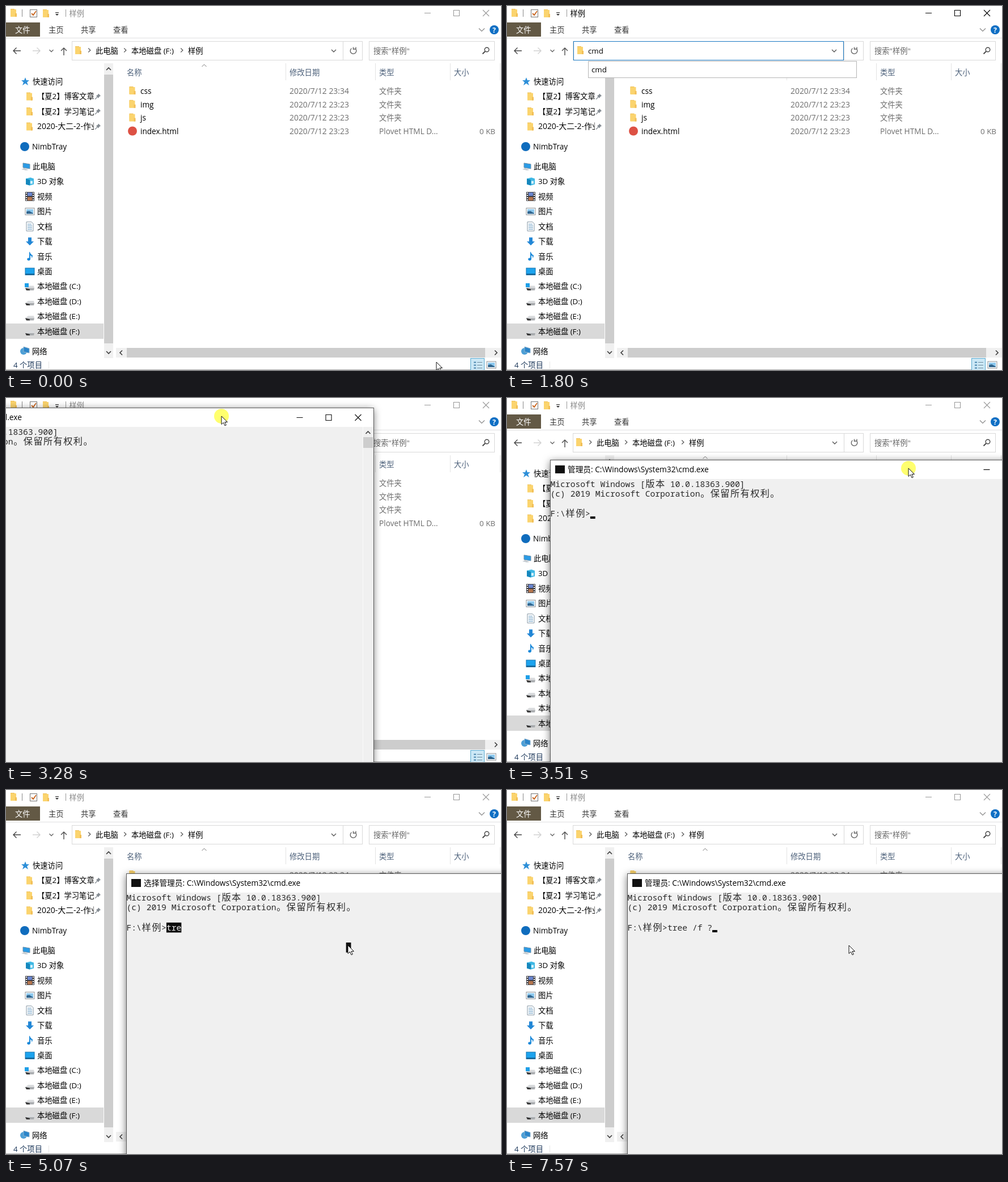
Recreate the animation shown at these times as an HTML page. Size 873 by 642 pixels, loop 8000 ms.

```html
<!DOCTYPE html>
<html lang="zh-CN">
<head>
<meta charset="utf-8">
<title>Explorer and console</title>
<style>
html, body { margin: 0; width: 100%; height: 100%; overflow: hidden; background: #fff; }
svg { display: block; width: 100%; height: 100%; }
text { font-family: "Open Sans", "Noto Sans CJK SC", "Noto Sans CJK", sans-serif; white-space: pre; }
.term { font: 300 14.67px "Noto Sans Mono", "Liberation Mono", monospace; }
.han { font: 300 16.2px "Noto Sans CJK SC", "Noto Sans CJK", sans-serif; }
</style>
</head>
<body>
<svg id="stage" viewBox="0 0 873 642" xmlns="http://www.w3.org/2000/svg"></svg>
<script>
const LOOP = 8000, CELL = 8.8, ROW = 17.6, INK = '#2b2b2b';
const stage = document.getElementById('stage');

// Drawing helpers
const esc = s => s.replace(/&/g, '&amp;').replace(/</g, '&lt;').replace(/>/g, '&gt;');
const rect = (x, y, w, h, fill, more = '') =>
  `<rect x="${x}" y="${y}" width="${w}" height="${h}" fill="${fill}" ${more}/>`;
const frame = (x, y, w, h, stroke) => rect(x + .5, y + .5, w - 1, h - 1, 'none', `stroke="${stroke}"`);
const path = (d, fill, more = '') => `<path d="${d}" fill="${fill}" ${more}/>`;
const line = (d, stroke, w = 1, more = '') => path(d, 'none', `stroke="${stroke}" stroke-width="${w}" ${more}`);
const circle = (x, y, r, fill, more = '') => `<circle cx="${x}" cy="${y}" r="${r}" fill="${fill}" ${more}/>`;
const text = (x, cy, s, fill = '#000', size = 13.3, more = '') =>
  `<text x="${x}" y="${cy + 4.8}" font-size="${size}" fill="${fill}" ${more}>${esc(s)}</text>`;
const group = (id, body) => `<g id="${id}">${body}</g>`;
const at = (x, y, body) => `<g transform="translate(${x} ${y})">${body}</g>`;

function chevron(x, y, dir, color = '#444', r = 4, w = 1.3) {
  const turn = { up: 0, right: 90, down: 180, left: 270 }[dir];
  return line(`M${-r} ${r / 2}L0 ${-r / 2}L${r} ${r / 2}`, color, w, `transform="translate(${x} ${y}) rotate(${turn})"`);
}
const folder = (x, y) => at(x, y,
  rect(-5, -7, 7, 13, '#eebf55') + path('M-5 -6H5V7H-5Z', '#fbd46e') + path('M3 1H6V7H3Z', '#f2bf58'));
const drive = (x, y) => at(x, y,
  path('M-8 1L-3 -3H7L8 1Z', '#d9dbdd') + path('M-8 1H8L7 5H-6Z', '#a9acaf') + path('M-8 1L0 3V5H-6Z', '#333'));
const picture = (x, y) => at(x, y,
  rect(-8, -6, 16, 12, '#fff', 'stroke="#8a8f94"') + rect(-6, -4, 12, 8, '#8cc8ee') +
  path('M-6 4V0L-1 -1L6 3V4Z', '#31658d'));
const pin = (x, y) => at(x, y,
  path('M1 -5L5 -1L3 0L1 3L-3 -1L0 -3Z', '#858c93') + line('M-1 1L-5 5', '#858c93', 1.3));
const monitor = (x, y) => at(x, y,
  path('M-5 -6L7 -4V4L-5 2Z', '#2a9be6', 'stroke="#6f8fa8"') + path('M-8 5L-3 3L5 6L0 7Z', '#c5cbd0'));
const controls = (min, max, close, y, color) =>
  line(`M${min - 5.5} ${y + .5}h11M${max - 5} ${y - 4.5}h10v10h-10ZM${close - 5.5} ${y - 5}l11 11m0 -11l-11 11`, color, 1.1);

// Half and full width characters on the console grid
function term(col, row, s, fill = INK) {
  let out = '';
  for (const run of s.match(/[\x20-\x7e]+|[^\x20-\x7e]+/g) || []) {
    const wide = run.charCodeAt(0) > 126, step = wide ? 2 : 1, inset = wide ? 1.2 : .5;
    const xs = [...run].map((c, i) => (inset + (col + i * step) * CELL).toFixed(1)).join(' ');
    out += `<text class="${wide ? 'han' : 'term'}" x="${xs}" y="${(46.8 + row * ROW).toFixed(1)}" fill="${fill}">${esc(run)}</text>`;
    col += run.length * step;
  }
  return out;
}
const cell = (col, row, n, fill) => rect(.5 + col * CELL, 33 + row * ROW, n * CELL, ROW, fill);

function sidebar() {
  const star = path('M0 -7L2 -2L7 -2L3 1.5L5 7L0 3.5L-5 7L-3 1.5L-7 -2L-2 -2Z', '#2d8fd8');
  const icons = {
    cube: path('M-7 -5L1 -7L7 -5V5L0 7L-7 5Z', '#3fb8e4') + path('M-7 -5L0 -3V7L-7 5Z', '#1587bd') + path('M1 -1H5V4H1Z', '#d7f1fb'),
    film: rect(-8, -8, 16, 16, '#3c3c42') + rect(-4, -7, 8, 6, '#6a86cf') + rect(-4, 1, 8, 6, '#b5764f') +
      line('M-6 -7V8M6 -7V8', '#fff', 2, 'stroke-dasharray="2 2"'),
    doc: path('M-6 -8H3L6 -5V8H-6Z', '#fff', 'stroke="#8395a3"') + line('M-4 -4H3M-4 -1H4M-4 2H4M-4 5H4', '#5b93bd'),
    down: path('M-3 -7H3V0H7L0 7L-7 0H-3Z', '#2287d6'),
    note: path('M0 -8Q1 -4 5 -2Q5 1 3 3Q4 -1 1 -2V5Q0 8 -3 7Q-6 6 -4 3Q-2 2 -1 3V-8Z', '#1687d9'),
    desk: rect(-8, -6, 16, 12, '#1ca3ee', 'stroke="#1673ad"') + rect(-8, 4, 16, 2, '#125c8c'),
  };
  let out = rect(0, 560, 172, 27, '#d9d9d9') + at(34, 133, star) + text(47, 133, '快速访问');
  ['【夏2】博客文章', '【夏2】学习笔记', '2020-大二-2-作业'].forEach((s, i) => {
    const y = 159.5 + i * 26.5;
    out += folder(41, y) + text(55, y, s, '#000', i < 2 ? 13.3 : 13.9, 'clip-path="url(#nameClip)"') + pin(162, y);
  });
  out += circle(33, 248, 8, '#0f6cbd') + text(46, 248, 'NimbTray', '#000', 13.6);
  out += monitor(35, 283) + text(47, 283, '此电脑');
  const rows = [['3D 对象', 'cube'], ['视频', 'film'], ['图片', ''], ['文档', 'doc'], ['下载', 'down'], ['音乐', 'note'], ['桌面', 'desk']];
  rows.forEach(([s, icon], i) => {
    const y = 309.5 + i * 26.45;
    out += (icon ? at(42, y, icons[icon]) : picture(42, y)) + text(55, y, s);
  });
  [...'CDEF'].forEach((c, i) => {
    const y = 494.5 + i * 26.5;
    out += drive(42, y + 2) + text(55, y, `本地磁盘 (${c}:)`);
  });
  out += rect(33, 489, 7, 7, '#1e9fe8');
  out += at(33, 608, circle(-2, 1, 6, '#4d9fd6') + path('M-2 -7L8 -4V4L-2 2Z', '#2a84c9', 'stroke="#8fb2cc"')) + text(46, 609, '网络');
  out += rect(173, 101, 16, 520, '#f0f0f0') + rect(173, 121, 16, 474, '#cdcdcd');
  return out + chevron(181, 111, 'up', '#404040', 4, 1.7) + chevron(181, 611, 'down', '#404040', 4, 1.7);
}

function fileList() {
  let out = '';
  [['名称', 213], ['修改日期', 500], ['类型', 658], ['大小', 790]].forEach(([s, x]) => out += text(x, 117, s, '#4c607a'));
  [493, 651, 783, 871].forEach(x => out += rect(x, 101, 1, 30, '#e3e3e3'));
  out += chevron(349.5, 105, 'up', '#777', 4, 1);
  ['css', 'img', 'js', 'index.html'].forEach((s, i) => {
    const y = 150 + i * 23.8, last = i === 3;
    out += last ? circle(223, 220.5, 8, '#dd5144') : folder(222.5, y - 1);
    out += text(237, y, s, '#000', 13.6);
    out += text(500, y, i ? '2020/7/12 23:23' : '2020/7/12 23:34', '#6d6d6d', 13.9);
    out += text(658, y, last ? 'Plovet HTML D...' : '文件夹', '#6d6d6d', last ? 13.7 : 13.3);
  });
  out += text(835, 221.4, '0 KB', '#6d6d6d', 13.4);
  out += rect(194, 603, 679, 17, '#f0f0f0') + rect(213, 603, 632, 17, '#cdcdcd');
  return out + chevron(203, 611.5, 'left', '#404040', 4, 1.7) + chevron(864, 611.5, 'right', '#404040', 4, 1.7);
}

function explorer() {
  let out = rect(0, 0, 873, 642, '#fff');
  out += folder(13, 12) + rect(28, 6, 1, 13, '#888') + folder(70, 13) + rect(105, 6, 1, 13, '#999');
  out += rect(42.5, 6.5, 12, 13, '#fff', 'stroke="#777"') + line('M45 13L48 16L53 9', '#c8641e', 1.8);
  out += rect(87, 11, 6, 1.2, '#333') + path('M87 14H93L90 17Z', '#333');
  out += group('winTitle', '');
  out += rect(0, 29, 60, 25, '#635945') + text(16, 42, '文件', '#fff');
  [['主页', 75], ['共享', 132], ['查看', 189]].forEach(([s, x]) => out += text(x, 42, s, '#333'));
  out += chevron(839, 42, 'down', '#8a8a8a', 5, 1.2) + circle(861, 42, 8, '#0f6fc4') +
    text(858, 42, '?', '#fff', 12.5, 'font-weight="700"');
  out += rect(0, 56, 873, 1, '#dfe0e1');
  out += line('M26 79H13M18.5 73.5L13 79L18.5 84.5', '#444', 1.4) + line('M47 79H60M54.5 73.5L60 79L54.5 84.5', '#d2d2d2', 1.4);
  out += chevron(80, 79, 'down', '#666', 3.5) + line('M102 87V74M97 79L102 74L107 79', '#555', 1.5);
  out += frame(116, 62, 513, 34, '#d9d9d9') + rect(594, 62, 1, 34, '#d9d9d9');
  out += line('M616 75A5.3 5.3 0 1 1 609.5 74.7M612.5 72.5V77M617 72.5V76H613', '#666', 1.4);
  out += frame(640, 62, 222, 34, '#d9d9d9') + text(648, 79, '搜索"样例"', '#666');
  out += circle(848, 77, 3.8, 'none', 'stroke="#444" stroke-width="1.4"') + line('M845 80L840.5 84.5', '#444', 1.8);
  out += group('address', '');
  out += sidebar() + fileList();
  out += text(13, 633, '4 个项目', '#1e395b') + rect(75, 627, 1, 13, '#e6e6e6');
  out += rect(819.5, 621.5, 24, 22, '#cce8f6', 'stroke="#58a9d0"');
  out += line('M825 628.5H829M825 633.5H829M825 638.5H829', '#4b86ad', 2) + line('M831 628.5H840M831 633.5H840M831 638.5H840', '#6d8a9c');
  return out + picture(856, 633) + rect(0, 641, 819, 1, '#a9a9a9');
}

const crumbs = folder(127, 78) + chevron(147, 78, 'right', '#555', 3.6) + text(158, 79, '此电脑') +
  chevron(210, 78, 'right', '#555', 3.6) + text(221, 79, '本地磁盘 (F:)') +
  chevron(310, 78, 'right', '#555', 3.6) + text(321, 79, '样例') + chevron(578, 79, 'down', '#555');

function addressEdit(t) {
  let out = rect(117, 62, 477, 34, '#fff') + frame(117, 62, 477, 34, '#1a78c2') +
    folder(129, 78) + chevron(577, 79, 'down', '#555');
  if (t < 1140) return out + rect(143, 69, 43, 20, '#0078d7') + text(143, 79, 'F:\\样例', '#fff');
  const n = t < 1250 ? 1 : t < 1360 ? 2 : 3;
  out += text(143, 79, 'cmd'.slice(0, n));
  return t < 1800 ? out + rect([150, 162, 171][n - 1], 70, 1, 18, '#000') : out;
}

function suggestions(t) {
  if (t < 1180 || t >= 2080) return '';
  const rows = t < 1290 ? ['cmd', 'C:\\', 'C:\\Windows', 'css', 'C:\\Windows\\System32'] : ['cmd'];
  const h = rows.length * 26 + 4;
  return rect(143, 97, 474, h, '#fff') + frame(143, 97, 474, h, '#b5b5b5') +
    rows.map((s, i) => text(149, 112 + i * 26, s)).join('');
}

function consoleWindow() {
  let out = rect(0, 0, 900, 636, '#fff', 'style="filter:drop-shadow(0 2px 7px rgba(0,0,0,.55))"');
  out += rect(0, 33, 900, 603, '#f0f0f0') + rect(881, 33, 1, 603, '#fafafa') + rect(882, 51, 17, 19, '#cdcdcd');
  out += chevron(890.5, 43, 'up', '#404040', 4, 1.7);
  out += rect(9, 9, 17, 14, '#111') + controls(770, 821, 873, 16, '#111');
  out += term(0, 0, 'Microsoft Windows [版本 10.0.18363.900]');
  out += term(0, 1, '(c) 2019 Microsoft Corporation。保留所有权利。') + term(0, 3, 'F:\\样例>');
  return out + group('live', '') + frame(0, -1, 901, 637, '#5a5a5a');
}

stage.innerHTML =
  '<defs><clipPath id="nameClip"><rect x="0" y="100" width="155" height="200"/></clipPath></defs>' +
  explorer() + group('drop', '') + group('console', consoleWindow()) +
  group('press', circle(0, 0, 13, '#ff0', 'opacity=".57"')) +
  group('arrow', path('M0 0V14.5L3.5 11.3L6 16.8L8.3 15.8L5.9 10.5H10.5Z', '#fff', 'stroke="#111"')) +
  group('beam', line('M-3 -6.5H-1L0 -5.5L1 -6.5H3M0 -5.5V5.5M-3 6.5H-1L0 5.5L1 6.5H3', '#111', 1.2));

const el = id => document.getElementById(id);
const show = (id, on) => el(id).style.display = on ? '' : 'none';
const cache = {};
const fill = (id, html) => { if (cache[id] !== html) el(id).innerHTML = cache[id] = html; };
const between = (t, a, b) => t >= a && t < b;
const clamp = p => Math.max(0, Math.min(1, p));
const ease = p => (p = clamp(p), p * p * (3 - 2 * p));
const latest = (list, t) => list.filter(k => k[0] <= t).pop()[1];

const mouse = [[30, 759, 628], [520, 409, 75], [2079, 409, 75], [2080, 407, 75], [2900, 407, 75], [3200, 380, 32],
  [3280, 380, 32], [3640, 844, 162], [3790, 844, 162], [3950, 606, 274], [4080, 606, 274], [4150, 603, 274]];
const presses = [[560, 660], [3230, 3790], [3960, 4120]];
const typed = [[0, ''], [4380, 't'], [4760, 'tr'], [5070, 'tre'], [5270, 'tree'], [6370, 'tree /'], [6470, 'tree /f'], [7540, 'tree /f ?']];
const caret = [[0, 0], [4380, -1], [5600, 4], [5960, -1], [6830, 8], [7030, -1], [7570, 9]];

function mouseAt(t) {
  const i = mouse.findIndex(k => k[0] > t);
  if (i < 1) return mouse[i < 0 ? mouse.length - 1 : 0].slice(1);
  const [a, x, y] = mouse[i - 1], [b, u, v] = mouse[i], p = ease((t - a) / (b - a));
  return [x + (u - x) * p, y + (v - y) * p];
}

function liveConsole(t) {
  const marking = between(t, 3960, 5860), composing = between(t, 4380, 5600);
  const word = latest(typed, t), pos = latest(caret, t);
  let out = text(31, 16.2, (marking ? '选择' : '') + '管理员: C:\\Windows\\System32\\cmd.exe', '#000', 13.7);
  if (marking) out += cell(44, 5, 1, '#0f0f0f');
  if (composing) out += cell(8, 3, word.length, '#0c0c0c');
  out += term(8, 3, word, composing ? '#f0f0f0' : INK);
  return pos < 0 ? out : out + rect(.5 + (8 + pos) * CELL, 99, CELL, 4, '#000');
}

function draw(t) {
  const active = between(t, 560, 2140), ink = active ? '#000' : '#999';
  fill('winTitle', text(111.5, 13, '样例', active ? '#000' : '#888') + controls(743.5, 794.5, 846.5, 12, ink));
  fill('address', between(t, 560, 2080) ? addressEdit(t) : crumbs);
  fill('drop', suggestions(t));

  const open = clamp((t - 2300) / 145), drag = ease((t - 3280) / 360);
  show('console', open > 0);
  el('console').setAttribute('opacity', open);
  el('console').setAttribute('transform',
    `translate(${-252 + 464 * drag} ${18 + 130 * drag}) translate(450 318) scale(${1 - .058 * (1 - open)}) translate(-450 -318)`);
  fill('live', liveConsole(t));

  const spot = `translate(${mouseAt(t).map(v => v.toFixed(1)).join(' ')})`;
  ['press', 'arrow', 'beam'].forEach(id => el(id).setAttribute('transform', spot));
  const beam = between(t, 500, 2080);
  show('press', presses.some(([a, b]) => between(t, a, b)));
  show('arrow', !beam);
  show('beam', beam && !between(t, 1140, 1930));
}

const start = performance.now();
function tick() {
  draw((performance.now() - start) % LOOP);
  requestAnimationFrame(tick);
}
tick();
</script>
</body>
</html>
```
